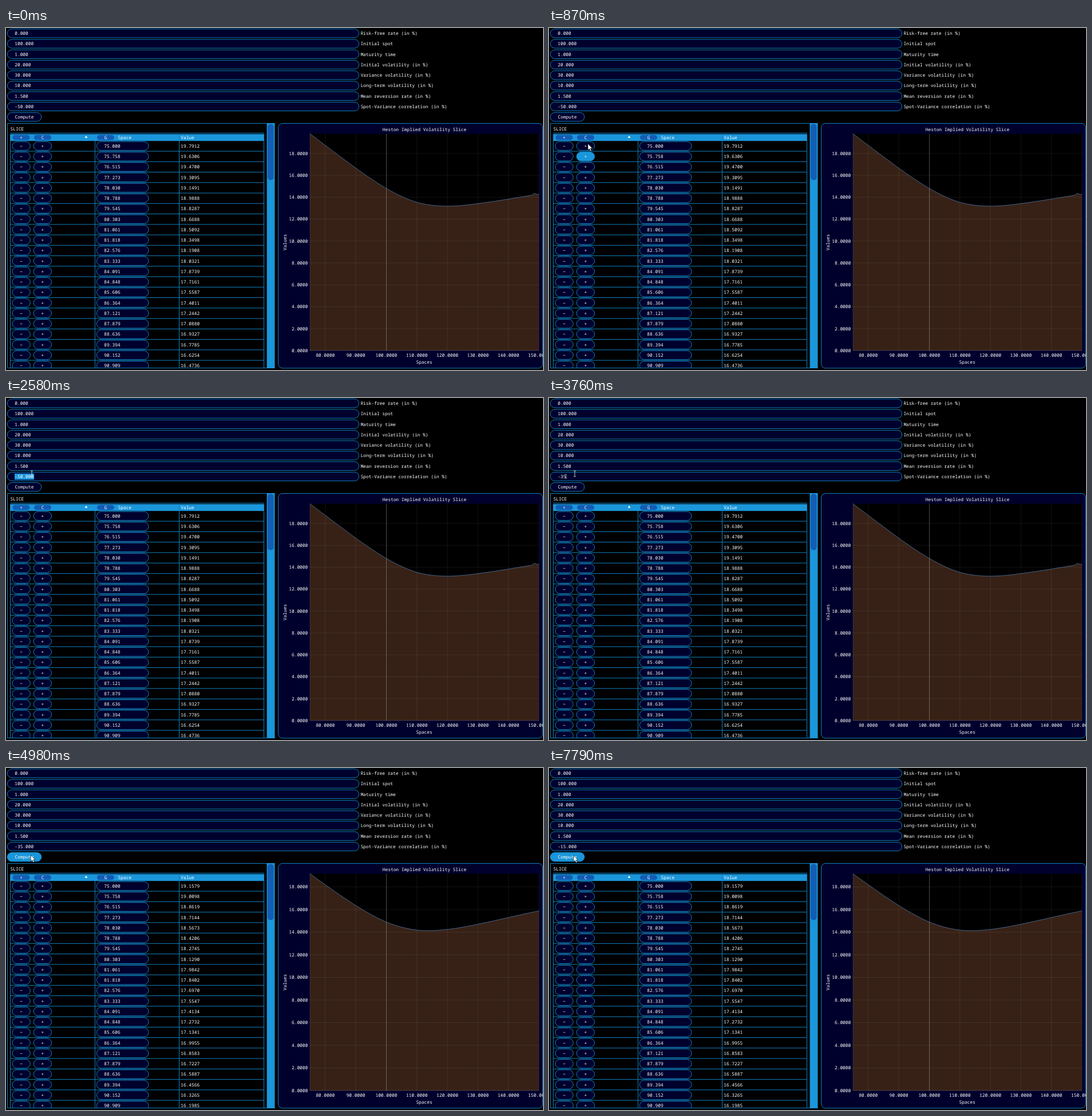
Write an HTML page that moves like this. It is 938 by 597 pixels and loops after 7.99 s.

```html
<!DOCTYPE html>
<html lang="en">
<head>
<meta charset="utf-8">
<title>Heston Implied Volatility Slice</title>
<style>
html, body { margin: 0; width: 100%; height: 100%; overflow: hidden; background: #000; }
svg { display: block; }
text { font: 7.88px "Noto Sans Mono", "DejaVu Sans Mono", monospace; fill: #fff; white-space: pre; text-rendering: geometricPrecision; }
.box { fill: #00002d; stroke: #1280c2; }
.hot { fill: #1a96da; stroke: #1a96da; }
.line { stroke: #1280c2; fill: none; }
.lit { fill: #1a96da; }
.deep { fill: #125db5; }
</style>
</head>
<body>
<svg id="stage" width="938" height="597" viewBox="0 0 938 597">
  <defs>
    <clipPath id="table"><rect x="2" y="160" width="468" height="434"/></clipPath>
    <clipPath id="plot"><rect x="476" y="167" width="461.5" height="427"/></clipPath>
  </defs>
  <g id="form"></g>
  <g id="list" clip-path="url(#table)"></g>
  <g id="chart"></g>
  <g id="edit">
    <rect id="mark" class="lit" x="15" y="131.8" width="34.2" height="10.8"/>
    <text id="entry" x="15.2" y="140"></text>
    <path id="caret" stroke="#fff" stroke-width=".8"/>
  </g>
  <path id="arrow" d="M0 0V11L2.5 8.8L4.2 12.8L6.1 12L4.4 8.1H7.6Z" fill="#fff" stroke="#000" stroke-width=".6"/>
  <path id="beam" d="M-2-5H-.6L0-4.5L.6-5H2M0-4.5V4.5M-2 5H-.6L0 4.5L.6 5H2" fill="none" stroke="#e4e4e4" stroke-width=".9"/>
</svg>
<script>
const LOOP = 7990, PITCH = 18.25, ROWS = 22, ADVANCE = 4.73;
const $ = id => document.getElementById(id);

const text = (x, y, s, extra = "") => `<text x="${x}" y="${y + 2.85}" ${extra}>${s}</text>`;
const mid = 'text-anchor="middle"';
const pill = (x, y, w, h = 15.3, cls = "box", id = "") =>
  `<rect ${id && `id="${id}"`} class="${cls}" x="${x}" y="${y - h / 2}" width="${w}" height="${h}" rx="${h / 2}"/>`;
const rule = d => `<path class="line" d="${d}"/>`;

// Parameter form
const params = [
  ["0.000", "Risk-free rate (in %)"], ["100.000", "Initial spot"], ["1.000", "Maturity time"],
  ["20.000", "Initial volatility (in %)"], ["30.000", "Variance volatility (in %)"],
  ["10.000", "Long-term volatility (in %)"], ["1.500", "Mean reversion rate (in %)"],
  ["", "Spot-Variance correlation (in %)"]
];
const buttons = [{ id: "compute", x: 2.3, y: 155.3, w: 59.5 }];
$("form").innerHTML = params.map(([value, label], i) => {
  const y = 9.3 + PITCH * i;
  return pill(2.3, y, 614.2) + text(15.2, y, value) + text(619.4, y, label);
}).join("") + pill(2.3, 155.3, 59.5, 15.3, "box", "compute") + text(32, 155.4, "Compute", mid);

// Volatility smile: cubic interpolation through a few shared strikes
const space = i => 75 + 75 * i / 99;
const strikes = [0, 7, 14, 21].map(space).concat([100, 110, 120, 130, 140, 150]);
const smiles = [
  { vols: [19.7912, 18.6688, 17.5587, 16.4736, 14.80, 13.53, 13.18, 13.42, 13.83, 14.28], bump: .15 },
  { vols: [19.1579, 18.1290, 17.1341, 16.1985, 14.89, 14.18, 14.24, 14.70, 15.29, 15.88], bump: 0 }
];

function vol({ vols, bump }, x) {
  const seg = strikes.findIndex(k => k >= x) - 1;
  const from = Math.max(0, Math.min(strikes.length - 4, seg - 1));
  let sum = Math.max(0, bump * (1 - Math.abs(x - 148.5) / .7));
  for (let i = from; i < from + 4; i++) {
    let weight = vols[i];
    for (let j = from; j < from + 4; j++)
      if (j !== i) weight *= (x - strikes[j]) / (strikes[i] - strikes[j]);
    sum += weight;
  }
  return sum;
}

// Value table
function buildTable() {
  let s = text(7.5, 175.9, "SLICE") + rule("M7.5 183.5H451");
  s += '<rect class="lit" x="7.5" y="185.2" width="443.5" height="12"/>';
  [[11.5, "+"], [49, "C"], [159, "G"]].forEach(([x, c]) => {
    s += pill(x, 191.1, 30, 8.8, "deep") + text(x + 15, 191.2, c, mid);
  });
  s += text(195.5, 191.2, "Space") + text(305.2, 191.2, "Value");
  s += '<path d="M137.6 191.7L140 187.7L142.4 191.7Z" fill="#fff"/>';
  for (let i = 0; i < ROWS; i++) {
    const y = 206 + PITCH * i;
    [["m", 11, "−"], ["p", 48.2, "+"]].forEach(([k, x, c]) => {
      const id = k + i;
      buttons.push({ id, x, y, w: 31.3 });
      s += pill(x, y, 31.3, 15.3, "box", id) + text(x + 15.7, y, c, mid);
    });
    s += pill(158.3, y, 90.7) + text(171.3, y + .1, space(i).toFixed(3));
    s += text(305.2, y + .1, "", `id="v${i}"`);
    s += rule(`M7.5 ${y + 9.1}H451`);
  }
  s += rule("M7.5 185V594M155.5 197V594M302.5 185V594M450.5 185V594M2.5 594V166.5H469.5M2 593.5H470");
  s += '<rect class="lit" x="455.6" y="166" width="13.9" height="428"/>';
  s += '<rect class="deep" x="457" y="167.5" width="10.6" height="98" rx="5"/>';
  $("list").innerHTML = s;
}
buildTable();

// Chart
const X = v => 531 + (v - 75) * 400 / 75;

function drawChart(n) {
  const smile = smiles[n], scale = 378.4 / smile.vols[0];
  const Y = v => 563 - v * scale;
  const points = [];
  for (let v = 75; v <= 150; v += .5) points.push(X(v) + " " + Y(vol(smile, v)));
  const curve = "M" + points.join("L");
  let grid = "", labels = text(731, 177.2, "Heston Implied Volatility Slice", mid);
  for (let v = 80; v <= 150; v += 10) {
    grid += `M${X(v)} 184.6V563`;
    labels += text(X(v), 571.6, v.toFixed(4), mid);
  }
  for (let v = 0; v <= 18; v += 2) {
    grid += `M531 ${Y(v)}H931`;
    labels += text(527.3, Y(v), v.toFixed(4), 'text-anchor="end"');
  }
  labels += text(730.5, 583.6, "Spaces", mid) + text(0, 0, "Values", mid + ' transform="translate(487 374) rotate(-90)"');
  $("chart").innerHTML = `
    <rect class="box" x="475.5" y="166.5" width="462" height="427.3" rx="7.5"/>
    <rect x="531" y="184.6" width="400" height="378.4"/>
    <path d="${curve}V563H531Z" fill="#372116"/>
    <path d="${grid}" stroke="#fff" stroke-opacity=".07"/>
    <path d="M664.5 184.6V563" stroke="#fff" stroke-opacity=".25"/>
    <path d="${curve}" fill="none" stroke="#4a6f98" stroke-width=".9"/>
    <path d="M531 184.6V563H931" fill="none" stroke="#fff" stroke-opacity=".13"/>
    <g clip-path="url(#plot)">${labels}</g>`;
  for (let i = 0; i < ROWS; i++) $("v" + i).textContent = vol(smile, space(i)).toFixed(4);
}

// Pointer: [start, end, steps, x, y], each move starts where the last one ended
const moves = [
  [930, 1140, 4, 46, 130], [1210, 1350, 3, 41, 159], [2100, 2580, 8, 45, 132],
  [3960, 4500, 7, 43, 154], [4910, 5460, 8, 45, 138], [7310, 7790, 6, 43, 152.5]
];

function pointer(t) {
  if (t < 380) return [-50, -50];
  // Sweep in from the bottom along a curve, then go from stop to stop
  const u = Math.min(7, Math.floor((t - 380) / 70)) / 7, w = 1 - u;
  let x = w * w * 590 + 2 * u * w * 70 + u * u * 68;
  let y = w * w * 590 + 2 * u * w * 240 + u * u * 202;
  for (const [a, b, n, tx, ty] of moves) {
    if (t < a) break;
    const k = Math.min(n, 1 + Math.floor((t - a) * (n - 1) / (b - a) + 1e-6)) / n;
    x += (tx - x) * k;
    y += (ty - y) * k;
  }
  return [x, y];
}

// Each edit: select all, type the keys, commit
const edits = [
  { old: "-50", now: "-35", select: 2510, keys: [3040, 3630, 3760], commit: 3960 },
  { old: "-35", now: "-15", select: 5390, keys: [5990, 6850, 6980], commit: 7310 }
];

function drawEntry(t) {
  const { old, now, select, keys, commit } = edits[t < 4710 ? 0 : 1];
  const typed = keys.filter(k => k <= t).length;
  const typing = typed > 0 && t < commit;
  const value = typing ? now.slice(0, typed) : (typed ? now : old) + ".000";
  $("entry").textContent = value;
  $("mark").style.display = t >= select && !typed ? "" : "none";
  $("caret").setAttribute("d", typing ? `M${15.5 + value.length * ADVANCE} 132.5V141.5` : "");
}

let shown = -1;
function render(t) {
  const n = t < 4710 ? 0 : 1;
  if (n !== shown) drawChart(shown = n);
  drawEntry(t);

  // Highlight follows the pointer one step late
  const [hx, hy] = pointer(t - 70);
  for (const b of buttons) {
    const over = hx >= b.x && hx <= b.x + b.w && Math.abs(hy - b.y) <= 7.7;
    $(b.id).setAttribute("class", over ? "hot" : "box");
  }

  const [x, y] = pointer(t), inField = y > 0 && y < 144.8 && x < 616;
  $("arrow").style.display = inField ? "none" : "";
  $("beam").style.display = inField ? "" : "none";
  $(inField ? "beam" : "arrow").setAttribute("transform", `translate(${x} ${y})`);
}

const start = performance.now();
function tick() {
  render((performance.now() - start) % LOOP);
  requestAnimationFrame(tick);
}
tick();
</script>
</body>
</html>
```
